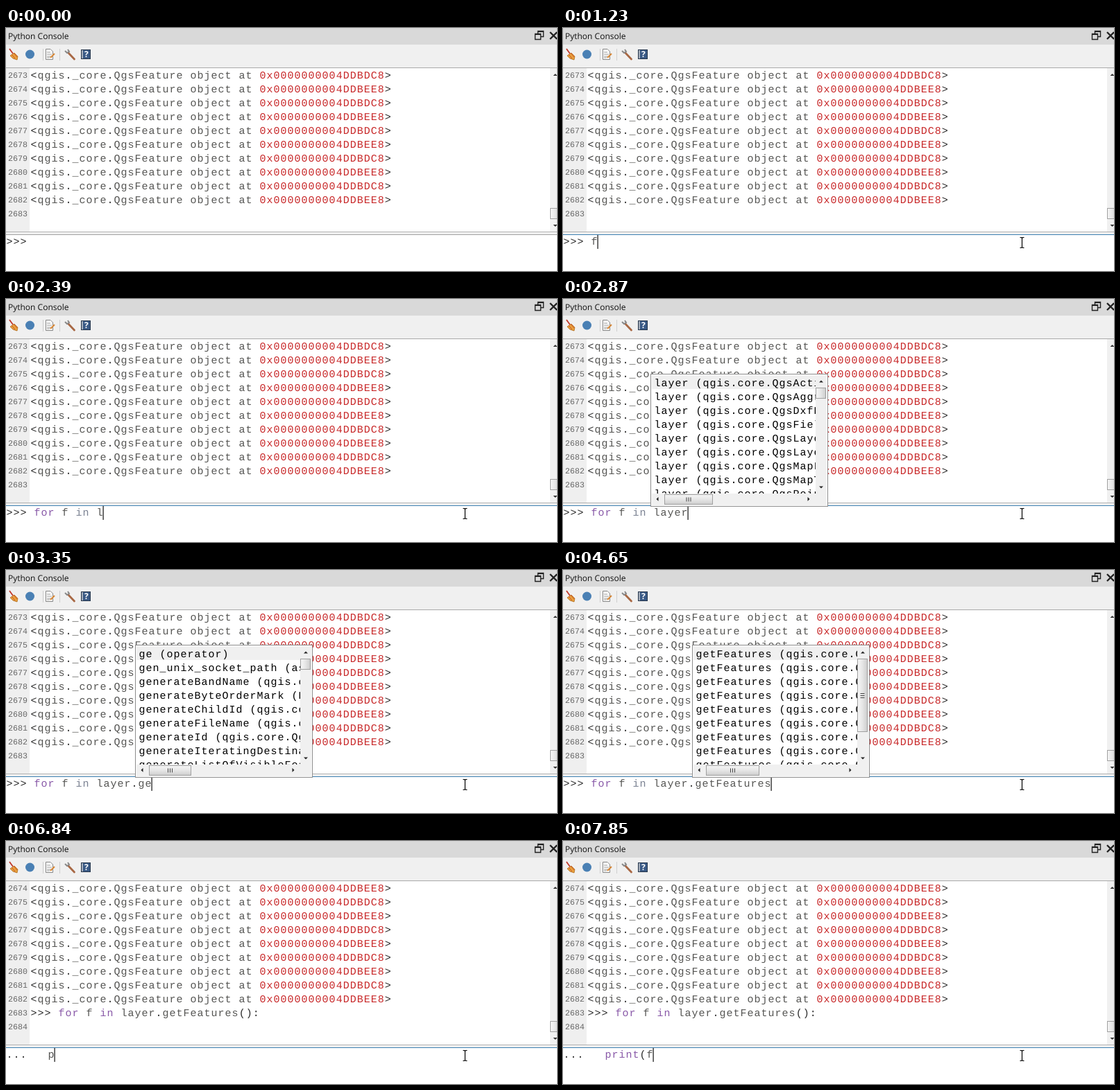
Animation, 794 px wide and 351 px high, one loop 8000 ms. Source, as an HTML page:

```html
<!DOCTYPE html>
<html lang="en">
<head>
<meta charset="utf-8">
<title>Python console typing</title>
<style>
html, body { margin: 0; width: 100%; height: 100%; overflow: hidden; background: #fff }
svg { display: block }
#stage { position: absolute; left: 0; top: 0 }
text { white-space: pre; fill: #555553; font: 15px "Liberation Mono", monospace; letter-spacing: 1px; text-rendering: geometricPrecision }
.no { font-size: 11.67px; letter-spacing: 0; fill: #666 }
.ui { font: 12px "Open Sans", sans-serif; letter-spacing: 0; fill: #111 }
.item { fill: #000 }
.num { fill: #c82829 }
.key { fill: #8959a8 }
.op { fill: #2c2c2c }
.dim { fill: #7b8292 }
</style>
</head>
<body>
<svg id="stage" width="794" height="351" viewBox="0 0 794 351">
  <defs>
    <linearGradient id="down" x2="0" y2="1">
      <stop stop-color="#f6f6f6"/><stop offset=".5" stop-color="#e6e6e6"/><stop offset="1" stop-color="#cdcdcd"/>
    </linearGradient>
    <linearGradient id="across">
      <stop stop-color="#f6f6f6"/><stop offset=".5" stop-color="#e6e6e6"/><stop offset="1" stop-color="#cdcdcd"/>
    </linearGradient>
  </defs>
  <rect width="794" height="351" fill="#fff"/>
  <rect width="794" height="24" fill="#d9d9d9"/>
  <text class="ui" x="3" y="16">Python Console</text>
  <g fill="none" stroke="#222">
    <path d="M766.5 8V4.5H774.5V12.5H771M762.5 8.5H770.5V16.5H762.5Z" stroke-width="1.4"/>
    <path d="M766 5H775M762 9H771" stroke-width="2"/>
    <path d="M784 6L794 16M794 6L784 16" stroke-width="2.4"/>
  </g>
  <rect y="24" width="794" height="33" fill="#f0f0f0"/>

  <!-- toolbar -->
  <path d="M5 30L10 37" stroke="#c0392b" stroke-width="1.8"/>
  <path d="M6 40L12 36L17 41L16 46L10 44Z" fill="#e8a33d" stroke="#b06a1c" stroke-width=".8"/>
  <path d="M8 38L13 44M11 36L16 42" stroke="#c8502a"/>
  <circle cx="34.5" cy="38" r="6.5" fill="#4a80b4"/>
  <path d="M53.5 30V47M77.5 30V47" stroke="#d0d0d0"/>
  <path d="M57.5 30.5H64L67.5 34V45.5H57.5Z" fill="#fff" stroke="#858585"/>
  <path d="M59 35H64M59 38H66M59 41H65M59 43H63" stroke="#999"/>
  <path d="M64 43L70 37" stroke="#d98a3a" stroke-width="2.2"/>
  <path d="M90 36L98.5 45" stroke="#a86844" stroke-width="2.8" stroke-linecap="round"/>
  <path d="M85 33L88 36L91 34L89 31" fill="none" stroke="#888" stroke-width="2"/>
  <rect x="108.5" y="31.5" width="13" height="13" fill="#3a5a86" stroke="#26364c"/>
  <path d="M110 32V44" stroke="#a5aebb" stroke-width="2"/>
  <text class="ui" x="113" y="42" style="fill:#fff;font-weight:bold">?</text>

  <!-- output pane -->
  <path d="M0 57.5H794" stroke="#a9a9a9"/>
  <rect y="58" width="34" height="236" fill="#efefef"/>
  <g id="log"></g>
  <rect x="784" y="58" width="10" height="236" fill="#f0f0f0"/>
  <rect x="784.5" y="260.5" width="14" height="15" fill="url(#across)" stroke="#a0a0a0"/>
  <path d="M788.5 69L791.5 66L794.5 69ZM788.5 284L791.5 287L794.5 284Z" fill="#333"/>
  <path d="M0 294.5H794" stroke="#b4b4b4"/>
  <rect y="295" width="794" height="3" fill="#f0f0f0"/>
  <path id="edge" d="M0 298.5H794"/>

  <g id="entry"></g>
  <g id="popup"></g>
  <path id="mouse" d="M-3 -7.500H-1L0 -6.500L1 -7.500H3M0 -6.500V6.500M-3 7.500H-1L0 6.500L1 7.500H3" fill="none" stroke="#000" stroke-width="1.2"/>
</svg>
<script>
const $ = id => document.getElementById(id);
const LOOP = 8000, ENTER = 5830;
const COMMAND = 'for f in layer.getFeatures():';
const BODY = '  print(f';

// Times at which each further character appears
const commandTimes = [1080, 1240, 1400, 1550, 1700, 1850, 2010, 2090,
  2170, 2320, 2470, 2600, 2730, 2870, 3020, 3170,
  3350, 3500, 3650, 3810, 3960, 4110, 4270, 4420, 4540, 4650, 5050, 5200, 5600];
const bodyTimes = [6290, 6520, 6840, 6930, 7030, 7120, 7220, 7620, 7850];
const mousePath = [[70, 689, 344], [150, 668, 322], [220, 661, 310]];

const inCore = (name, classes) => classes.split(' ').map(c => `${name} (qgis.core.Qgs${c})`);
const completions = [
  'fobj (zipfile)', 'focalLength (qgis.core)', 'fold (textwrap)', 'folder (mailbox)', 'font (qgis.core.QgsText)',
  ...inCore('force', 'Layer Geometry'), 'fork (os)', 'format (string)',
  ...inCore('format', 'Action Expression Field Point Raster Vector'),
  'in_dll (ctypes)', 'inc (qgis.core.QgsStep)', 'indent (textwrap)',
  ...inCore('index', 'Feature Field Layer Map Point Vector'),
  'label (qgis.core.QgsAction)', ...inCore('labelRect', 'Label Map'),
  ...inCore('layer', 'ActionScope Aggregate DxfExport FieldModel LayerItem LayerTree MapLayer MapTool PointLocator'),
  'ge (operator)', 'gen_unix_socket_path (asyncio)', 'generateBandName (qgis.core.Qgs)',
  'generateByteOrderMark (PyQt5)', 'generateChildId (qgis.core.Qgs)', 'generateFileName (qgis.core.Qgs)',
  'generateId (qgis.core.QgsAction)', 'generateIteratingDestination (qgis)', 'generateListOfVisibleFeatures (qgis)',
  'get (configparser)', 'getAction (qgis.core.Qgs)', 'getAddresses (email)', 'getBands (qgis.core)',
  'getColor (qgis.core.Qgs)', 'getContext (decimal)', 'getData (qgis.core)', 'getDate (qgis.core)', 'getDouble (PyQt5)',
  ...inCore('getFeature', 'Layer Vector Provider Server'),
  ...inCore('getFeatures', 'CacheIndex CacheIndexFid CachePoint CacheSpatial CachedSource Feature FeatureSource Vector VectorData VectorLayer')
];

const escape = s => s.replace(/&/g, '&amp;').replace(/</g, '&lt;').replace(/>/g, '&gt;');
const text = (x, y, body, cls = '') => `<text x="${x}" y="${y}" class="${cls}">${body}</text>`;
const box = (x, y, w, h, fill, line = 'none') =>
  `<rect x="${x}" y="${y}" width="${w}" height="${h}" fill="${fill}" stroke="${line}"/>`;
const arrow = (x, y, turn) =>
  `<path d="M-3 1.500L0 -1.500L3 1.500Z" fill="#222" transform="translate(${x} ${y}) rotate(${turn})"/>`;

function paint(code, live) {
  return code.replace(/0x\w+|\b(for|print|in)\b|[<>.():]+/g, part => {
    const cls = part.startsWith('0x') ? 'num'
      : part === 'in' && live ? 'dim'
      : /\w/.test(part) ? 'key' : 'op';
    return `<tspan class="${cls}">${escape(part)}</tspan>`;
  });
}

function drawLog(first) {
  let out = '';
  for (let i = 0; i < 11; i++) {
    const n = first + i, y = 73 + 20 * i;
    const line = n < 2683
      ? `<qgis._core.QgsFeature object at 0x0000000004DDB${n % 2 ? 'DC8' : 'EE8'}>`
      : n === 2683 && first === 2674 ? '>>> ' + COMMAND : '';
    out += text(3, y - 1, n, 'no') + text(35.5, y, paint(line));
  }
  return out;
}

function drawEntry(prompt, typed, focused) {
  const end = (prompt.length + typed.length) * 10;
  const marked = typed.endsWith('()') ? 2 : typed.endsWith(':') ? 1 : 0;
  return box(end - marked * 10, 299, marked * 10, 20, '#b7f907')
    + text(0.5, 313, `<tspan class="op">${escape(prompt)}</tspan>` + paint(typed, true))
    + (focused ? box(end - 0.5, 299, 1.2, 20, '#111') : '');
}

function drawPopup(typed) {
  if (typed.endsWith('getFeatures(')) {
    return box(172.5, 321.5, 640, 21, '#fff', '#999')
      + text(177, 337, escape('getFeatures(QgsFeatureRequest request=QgsFeatureRequest()) -> QgsFeatureIterator'), 'dim');
  }
  const word = typed.match(/\w*$/)[0];
  const items = completions.filter(c => word.length > 1 && c.startsWith(word));
  if (!items.length) return '';
  const x = (4 + typed.length - word.length) * 10 - 4;
  const exact = word === 'getFeatures';
  const wide = exact ? 77 : word.startsWith('ge') ? 61 : 70;
  const tall = exact ? 106 : 16;
  const grip = '<path d="M-3 -3V3M0 -3V3M3 -3V3" stroke="#444"';
  return box(x + .5, 108.5, 255, 191, '#fff', '#8c8c8c')
    + `<svg x="${x + 2}" y="110" width="236" height="171">`
    + box(0, 0, 236, 20, '#f0f0f0')
    + items.slice(0, 9).map((item, i) => text(3.5, 16 + 20 * i, item, 'item')).join('') + '</svg>'
    + box(x + 238, 110, 16, 171, '#f0f0f0') + box(x + 2, 281, 252, 17, '#f0f0f0')
    + box(x + 238.5, 128.5, 14, tall - 1, 'url(#across)', '#a0a0a0')
    + box(x + 20.5, 282.5, wide - 1, 14, 'url(#down)', '#a0a0a0')
    + arrow(x + 246, 119, 0) + arrow(x + 246, 272, 180)
    + arrow(x + 10, 289, -90) + arrow(x + 228, 289, 90)
    + `${grip} transform="translate(${x + 20 + wide / 2} 289.5)"/>`
    + (tall > 20 ? `${grip} transform="translate(${x + 245.5} 181.5) rotate(90)"/>` : '');
}

const count = (times, t) => times.filter(at => at <= t).length;
let shown = '';

function render(t) {
  const entered = t >= ENTER;
  const typed = entered ? BODY.slice(0, count(bodyTimes, t)) : COMMAND.slice(0, count(commandTimes, t));
  const focus = count([540, 620], t);
  const spot = mousePath.filter(p => p[0] <= t).pop();
  const state = [entered, typed, focus, spot].join('|');
  if (state === shown) return;
  shown = state;
  $('log').innerHTML = drawLog(entered ? 2674 : 2673);
  $('entry').innerHTML = drawEntry(entered ? '... ' : '>>> ', typed, focus);
  $('popup').innerHTML = drawPopup(typed);
  $('edge').setAttribute('stroke', ['#a0a0a0', '#6f93ab', '#3c7fb1'][focus]);
  $('mouse').setAttribute('transform', spot ? `translate(${spot[1] + .5} ${spot[2]})` : 'translate(-50 0)');
}

const start = performance.now();
function tick() {
  render((performance.now() - start) % LOOP);
  requestAnimationFrame(tick);
}
tick();
</script>
</body>
</html>
```
